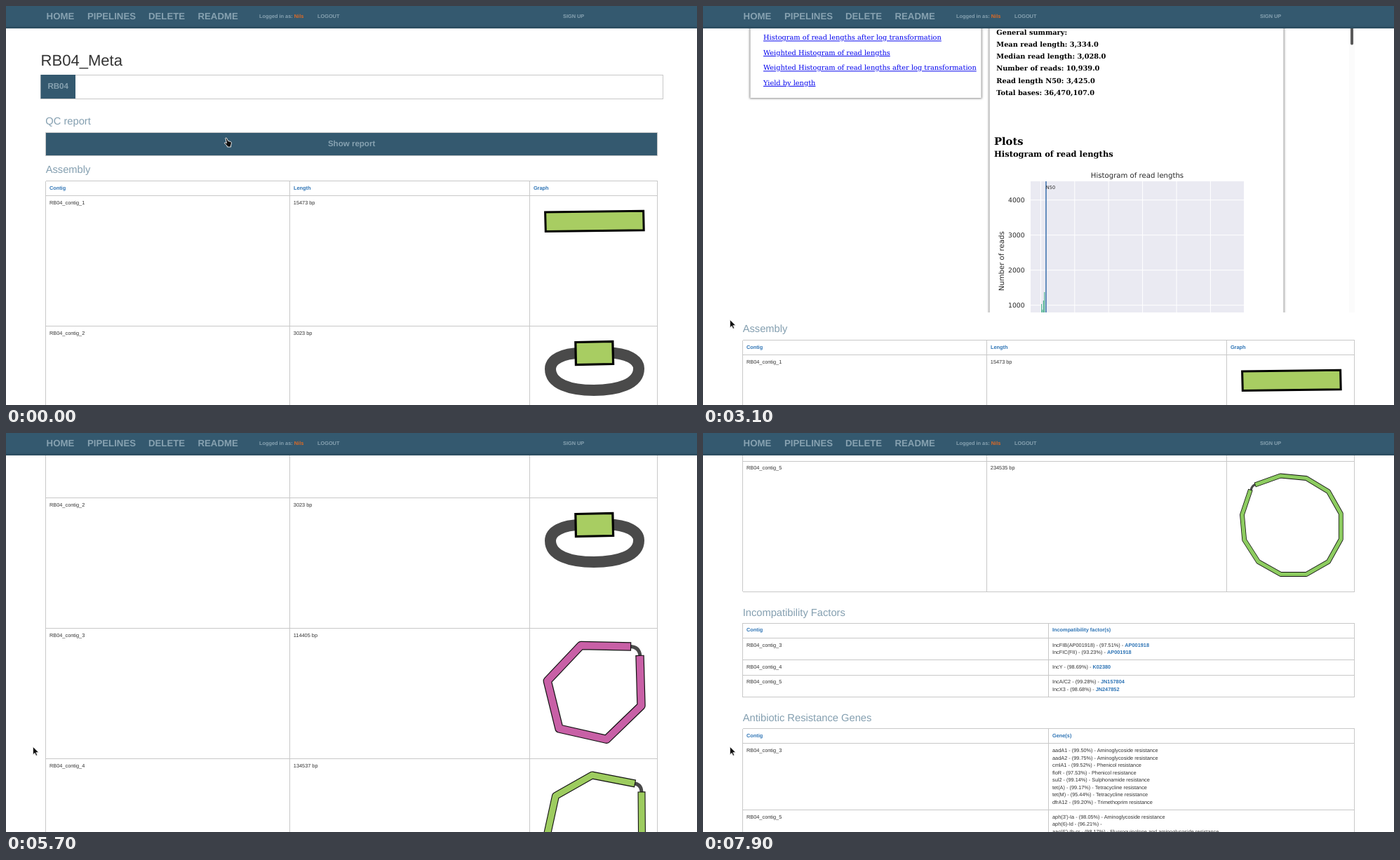
An HTML page that plays this animation: 985 px wide and 569 px high, repeating every 8 s.

```html
<!DOCTYPE html>
<html lang="en">
<head>
<meta charset="utf-8">
<title>Assembly report</title>
<style>
  html, body { margin: 0; width: 100%; height: 100%; overflow: hidden; background: #fff; }
  svg { display: block; }
  text { font: 7.35px "Liberation Sans", Arial, sans-serif; fill: #333; white-space: pre; text-rendering: geometricPrecision; }
  .b { font-weight: bold; }
  .nav { font-size: 13.23px; }
  .pale { fill: #87a2b1; }
  .h1 { font-size: 22.05px; }
  .h2 { font-size: 14.7px; fill: #849fb0; }
  .btn { font-size: 11.55px; font-weight: bold; text-anchor: middle; }
  .link { fill: #2e74b5; font-weight: bold; }
  .serif { font-family: "DejaVu Serif", serif; font-size: 9.8px; fill: #000; }
  .toc { fill: #00e; text-decoration: underline; }
  .plot { font-family: "DejaVu Sans", sans-serif; font-size: 10.15px; fill: #262626; }
  .lines { fill: none; stroke: #c8c8c8; shape-rendering: crispEdges; }
</style>
</head>
<body>
<svg id="stage" width="985" height="569" viewBox="0 0 985 569">
  <defs>
    <filter id="blur" filterUnits="userSpaceOnUse" x="50" y="210" width="890" height="520"><feGaussianBlur stdDeviation="1.7"/></filter>
    <clipPath id="frame"><rect x="56" y="215" width="873" height="490"/></clipPath>
    <linearGradient id="bar" x2="0" y2="1">
      <stop offset=".86" stop-color="#34596f"/><stop offset="1" stop-color="#2a4a5d"/>
    </linearGradient>
  </defs>
  <g id="page"></g>
  <g id="header"></g>
  <g id="cursor">
    <path id="arrow" d="M0 0V11.2L2.6 8.8 4.3 12.7 6.1 11.9 4.4 8.1H8Z" fill="#111" stroke="#fff" stroke-width=".6"/>
    <path id="hand" d="M.3.5Q1.4-.6 2.4.8L4 4.4 8 5.6Q9.2 6 8.8 8.4L8 11V13H3L2.4 11 -1 8Q-1.2 6.6.4 6.8L2 7.6Z" transform="translate(-.5 0)" fill="#111" stroke="#fff" stroke-width=".9"/>
  </g>
</svg>
<script>
const LOOP = 8000, REPORT_HEIGHT = 495, DARK = '#34596f', GREY = '#4a4a4a';
const $ = id => document.getElementById(id);

const text = (x, y, s, cls = '', extra = '') => `<text x="${x}" y="${y}" class="${cls}" ${extra}>${s}</text>`;
const rect = (x, y, w, h, fill, extra = '') => `<rect x="${x}" y="${y}" width="${w}" height="${h}" fill="${fill}" ${extra}/>`;
const path = (d, stroke, width, extra = '') => `<path d="${d}" fill="none" stroke="${stroke}" stroke-width="${width}" ${extra}/>`;

// Ruled table: row tops plus the bottom, and column edges.
const grid = (xs, ys) => {
  const [x0, x1, y0, y1] = [xs[0], xs.at(-1), ys[0], ys.at(-1)];
  return `<path class="lines" d="${ys.map(y => `M${x0} ${y}H${x1}`).join('')}${xs.map(x => `M${x} ${y0}V${y1}`).join('')}"/>`;
};

const card = (x, y, w, h) =>
  rect(x - 1, y - 1, w + 2, h + 2, '#888', 'filter="url(#blur)"') + rect(x, y, w, h, '#fff');

// Thick outlined chain; the outline reaches one unit past the ends.
function chain(points, color, width, edge) {
  const past = (a, b) => {
    const d = Math.hypot(a[0] - b[0], a[1] - b[1]);
    return a.map((v, i) => v + (v - b[i]) / d * edge);
  };
  const n = points.length;
  const outer = [past(points[0], points[1]), ...points.slice(1, -1), past(points[n - 1], points[n - 2])];
  const line = (p, c, w) => path('M' + p.join('L'), c, w, 'stroke-linejoin="round"');
  return line(outer, '#111', width + 2 * edge) + line(points, color, width);
}

const graphs = [
  '<path d="M768.6 23.6 908.6 21.8 909.2 49.2 769.3 51Z" fill="#a8cd62" stroke="#000" stroke-width="3"/>',

  path('M820 38.5C793 38.5 776 48 776 61 776 83 805 91.5 838 91.5S902 83 902 60.5C902 48 885 38 858 38', GREY, 16) +
  '<path d="M811.8 23 864.8 22 865.6 54 812.4 55.2Z" fill="#a8cd62" stroke="#000" stroke-width="3.2"/>',

  path('M889 26Q903 26 904 40', GREY, 5) +
  chain([[890, 26], [819.5, 24.5], [771.7, 75], [788.5, 143], [856, 158.3], [905.5, 110.5], [903.5, 39.5]], '#c860a6', 10, 1.2),

  path('M895 35.3Q906 36 906 49', GREY, 5) +
  chain([[896, 35.3], [835.5, 23.5], [783.5, 53], [770.7, 111.5], [808, 157], [868.5, 154.5], [906.5, 110], [906, 48]], '#9dcc5f', 8.8, 1.1),

  path('M788 33.3Q782 35 781 42', GREY, 3.2) +
  chain([[787.5, 33.7], [823, 21], [860, 24.5], [891.5, 43.5], [909.3, 75], [909.3, 111.5], [891.5, 143.5],
    [860, 161.5], [823.5, 161.5], [791.5, 143.5], [771.7, 112.5], [768.5, 76.5], [780.2, 41.5]], '#8dcc60', 5.2, .8)
];

function report() {
  const toc = ['Histogram of read lengths', 'Histogram of read lengths after log transformation',
    'Weighted Histogram of read lengths', 'Weighted Histogram of read lengths after log transformation', 'Yield by length'];
  const stats = ['General summary:', 'Mean read length: 3,334.0', 'Median read length: 3,028.0',
    'Number of reads: 10,939.0', 'Read length N50: 3,425.0', 'Total bases: 36,470,107.0'];
  const head = (y, s, size) => text(415, y, s, 'serif b', `style="font-size:${size}px"`);
  let out = rect(921, 215, 8, 490, '#fbfbfb') + rect(923, 216, 4, 107.5, '#5a5a5a', 'rx="2"');

  out += card(67.5, 225, 329, 174);
  out += text(74, 251, 'Summary Statistics', 'serif b toc') + text(74, 273, 'Plots', 'serif b toc');
  out += toc.map((s, i) => text(86, 294.9 + 21.5 * i, s, 'serif toc')).join('');

  out += card(408.5, 225, 419, 500);
  out += head(263.8, 'NanoPlot report', 19.6) + head(287.3, 'Summary statistics', 14.7);
  out += stats.map((s, i) => text(418.3, 308.8 + 17.2 * i, s, 'serif b')).join('');
  out += head(465.6, 'Plots', 14.7) + head(483, 'Histogram of read lengths', 11.47);

  out += text(619, 512.6, 'Histogram of read lengths', 'plot', 'text-anchor="middle"');
  out += rect(467, 518, 304, 200, '#eaeaf2');
  for (let i = 0; i < 6; i++) out += path(`M${481.4 + 48.4 * i} 518V705`, '#fff', 1);
  for (let i = 0; i < 4; i++) {
    const y = 544.7 + 50 * i;
    out += path(`M467 ${y}H771`, '#fff', 1);
    out += text(458.6, y + 3.6, 4000 - 1000 * i, 'plot', 'text-anchor="end" style="font-size:9.25px"');
  }
  out += [693, 701, 688, 676].map((y, i) => rect(482 + 1.4 * i, y, 1.2, 30, '#55b595')).join('');
  out += path('M489 518V705', '#4477b0', 1.6);
  out += text(488.8, 528.8, 'N50', 'plot', 'style="font-size:6.6px"');
  out += text(0, 0, 'Number of reads', 'plot', 'text-anchor="middle" transform="translate(428.8 631.8) rotate(-90)"');
  return `<g id="report" clip-path="url(#frame)">${out}</g>`;
}

function assembly() {
  const xs = [56.5, 404.5, 746.5, 928.5], top = 744.5, rowTop = i => 765.5 + 186 * i;
  let out = text(56.7, 733, 'Assembly', 'h2') + grid(xs, [top, ...[0, 1, 2, 3, 4, 5].map(rowTop)]);
  out += ['Contig', 'Length', 'Graph'].map((s, i) => text(xs[i] + 5.4, top + 12, s, 'link')).join('');
  [15473, 3023, 114405, 134537, 234535].forEach((length, i) => {
    const y = rowTop(i);
    out += text(62, y + 12.1, `RB04_contig_${i + 1}`) + text(409.8, y + 12.1, length + ' bp');
    out += `<g transform="translate(0 ${y})">${graphs[i]}</g>`;
  });
  return out;
}

// Two-column table whose right cells hold several lines.
function geneTable(title, column, titleY, top, rows) {
  const ys = [top, top + 21];
  let out = text(56.7, titleY, title, 'h2');
  out += text(62, top + 12.2, 'Contig', 'link') + text(498, top + 12.2, column, 'link');
  for (const [contig, ...lines] of rows) {
    const y = ys.at(-1);
    out += text(62, y + 12.4, 'RB04_contig_' + contig);
    lines.forEach((s, i) => out += text(498, y + 12.4 + 10.5 * i, s));
    ys.push(y + 10.5 * lines.length + 10.7);
  }
  return out + grid([56.5, 492.5, 928.5], ys);
}

const ref = (s, id) => `${s} - <tspan class="link">${id}</tspan>`;
const gene = (name, pct, kind) => `${name} - (${pct}%) - ${kind} resistance`;
const AMINO = 'Aminoglycoside', TET = 'Tetracycline';

$('page').innerHTML =
  text(49.5, 84.8, 'RB04_Meta', 'h1') +
  '<rect x="49.5" y="98.5" width="887" height="33.5" class="lines"/>' +
  rect(49.5, 98, 49.5, 34, DARK) + text(74.2, 117.7, 'RB04', 'btn pale') +
  text(56.3, 168.8, 'QC report', 'h2') +
  '<rect id="button" x="56.5" y="180.5" width="872" height="33" stroke="#c8c8c8" shape-rendering="crispEdges"/>' +
  '<text id="label" x="492.6" y="199.6" class="btn"></text>' +
  report() +
  `<g id="lower">${assembly()}${
    geneTable('Incompatibility Factors', 'Incompatibility factor(s)', 1730, 1740.6, [
      [3, ref('IncFIB(AP001918) - (97.51%)', 'AP001918'), ref('IncFIC(FII) - (93.23%)', 'AP001918')],
      [4, ref('IncY - (98.69%)', 'K02380')],
      [5, ref('IncA/C2 - (99.28%)', 'JN157804'), ref('IncX3 - (98.68%)', 'JN247852')]
    ])}${
    geneTable('Antibiotic Resistance Genes', 'Gene(s)', 1880.6, 1891.2, [
      [3, gene('aadA1', '99.50', AMINO), gene('aadA2', '99.75', AMINO), gene('cmlA1', '99.52', 'Phenicol'),
        gene('floR', '97.53', 'Phenicol'), gene('sul2', '99.14', 'Sulphonamide'), gene('tet(A)', '99.17', TET),
        gene('tet(M)', '95.44', TET), gene('dfrA12', '99.20', 'Trimethoprim')],
      [5, gene("aph(3')-Ia", '98.05', AMINO), 'aph(6)-Id - (96.21%) -',
        gene("aac(6')-Ib-cr", '98.17', 'Fluoroquinolone and aminoglycoside')]
    ])}</g>`;

$('header').innerHTML =
  rect(0, 0, 985, 32, 'url(#bar)') +
  [[57.6, 'HOME'], [116, 'PIPELINES'], [203, 'DELETE'], [273.5, 'README']]
    .map(([x, s]) => text(x, 19.2, s, 'nav b pale')).join('') +
  text(361, 16.6, 'Logged in as: <tspan fill="#dd6a25">Nils</tspan>', 'b pale') +
  text(444, 16.6, 'LOGOUT', 'b pale') + text(794, 16.6, 'SIGN UP', 'b pale');

// Keyframes: [time, ...values], linear in between.
const scrollKeys = [[2600, 0], [3100, 268], [3300, 357], [3700, 357], [4000, 490], [4900, 490], [5100, 638],
  [5200, 638], [5300, 712], [5400, 712], [5500, 785], [5600, 785], [5700, 859], [5900, 1000],
  [6000, 1000], [6200, 1140], [6700, 1140], [7200, 1289], [7900, 1469.5]];
const cursorKeys = [[800, 313, 188], [1600, 80.5, 406.5], [1700, 83.5, 428], [2000, 90, 451.5],
  [2100, 90, 451.5], [2300, 38.5, 447.5]];

function sample(keys, t, ease = k => k) {
  if (t <= keys[0][0]) return keys[0].slice(1);
  const i = keys.findIndex(k => k[0] >= t);
  if (i < 0) return keys.at(-1).slice(1);
  const a = keys[i - 1], b = keys[i], k = ease((t - a[0]) / (b[0] - a[0]));
  return a.slice(1).map((v, j) => v + (b[j + 1] - v) * k);
}
const smooth = k => k * k * (3 - 2 * k);
const show = (id, on) => $(id).setAttribute('display', on ? 'inline' : 'none');
const move = (id, x, y) => $(id).setAttribute('transform', `translate(${x} ${y})`);

function draw(time) {
  const t = Math.floor(time % LOOP / 100) * 100;
  const open = t >= 100;
  const [scroll] = sample(scrollKeys, t);
  const [x, y] = sample(cursorKeys, t, smooth);
  const hover = y < 213;

  move('page', 0, -scroll);
  move('lower', 0, open ? 0 : -REPORT_HEIGHT);
  show('report', open);
  $('button').setAttribute('fill', hover ? DARK : '#fff');
  $('label').textContent = open ? 'Hide report' : 'Show report';
  $('label').style.fill = hover ? '#87a2b1' : '#333';
  move('cursor', x, y);
  show('hand', hover);
  show('arrow', !hover);
}

const start = performance.now();
function tick() {
  draw(performance.now() - start);
  requestAnimationFrame(tick);
}
tick();
</script>
</body>
</html>
```
